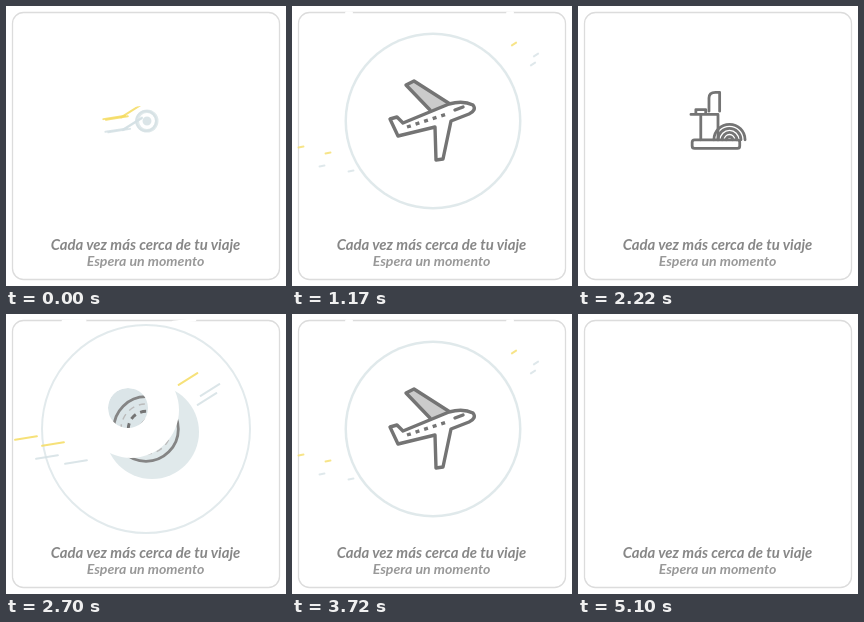
Write an HTML page that moves like this. It is 280 px wide and 280 px high and loops after 5.13 s.

```html
<!DOCTYPE html>
<html lang="es">
<head>
<meta charset="utf-8">
<style>
html, body { margin: 0; width: 100%; height: 100%; overflow: hidden; background: #fff; }
svg { display: block; width: 280px; height: 280px; }
text { font-family: Lato, sans-serif; font-style: italic; font-weight: 700; text-anchor: middle; }
.line { fill: none; stroke: #747474; stroke-width: 3.4; stroke-linejoin: round; stroke-linecap: round; }
.thin { stroke: #858585; stroke-width: 2.3; }
.dash { stroke-dasharray: 5 4; stroke-linecap: butt; }
.white { fill: #fff; }
.grey { fill: #cbcbcb; }
</style>
</head>
<body>
<svg viewBox="0 0 280 280">
  <rect x="6.5" y="6.5" width="267" height="267" rx="11" fill="#fff" stroke="#dcdcdc" stroke-width="1.3"/>
  <circle id="disc" fill="#e0e9eb"/>
  <circle id="backdrop" fill="#fff"/>
  <circle id="core" fill="#dbe5e8"/>
  <g id="icon">
    <g id="plane">
      <path class="line grey" d="M138 104L114 79L122 75L158 98"/>
      <path class="line white" d="M98 113L105 111L111 117L157 98Q171 94 181 99Q185 104 177 108L159 115L151 153L144 154L143 121L106 130Z"/>
      <path class="line" d="M115 121L155 108" stroke-dasharray="4 5" style="stroke-linecap:butt"/>
      <path class="line" d="M163 104L171 101"/>
    </g>
    <g id="engine" class="line" transform="translate(140 115) scale(.82) translate(-140 -115)">
      <rect x="108.5" y="138" width="58" height="10.5" rx="3"/>
      <path d="M129 103V87Q129 80 137 80H142V103M107 107H140M113 107V101H125V107M119 107V138M140 107V138"/>
      <g id="wheel"></g>
    </g>
    <g id="compass">
      <circle class="line thin" cx="140" cy="115" r="26.5"/>
      <circle class="line dash" cx="140" cy="115" r="20.5" style="stroke:#bbb;stroke-width:1.2"/>
      <circle class="line dash" cx="140" cy="115" r="14.5" style="stroke-width:2.4"/>
      <g id="needle">
        <path class="line thin grey" d="M117 115L134 110H146L163 115L146 120H134Z"/>
        <circle class="line thin white" cx="140" cy="115" r="3.6"/>
      </g>
    </g>
    <rect id="logo" x="99" y="74.5" width="82" height="81" fill="#b5b5b5"/>
  </g>
  <path id="wipe" fill="#fff" fill-rule="evenodd"/>
  <circle id="shock" fill="#d9e3e6" stroke="#d3dfe3"/>
  <g id="streaks" stroke-linecap="round"></g>
  <text x="139.5" y="244" font-size="14.9" fill="#878787">Cada vez más cerca de tu viaje</text>
  <text x="139.5" y="260" font-size="14.1" fill="#999">Espera un momento</text>
</svg>
<script>
const LOOP = 5130, CYCLE = LOOP / 6, STEP = 30;
const BURST = 120, SETTLE = 180;
const CX = 140, CY = 115;
const ORDER = ['engine', 'plane', 'engine', 'compass', 'plane', 'logo'];

const el = id => document.getElementById(id);
const set = (node, attrs) => { for (const k in attrs) node.setAttribute(k, attrs[k]); };
const clamp = x => Math.max(0, Math.min(1, x));
const ramp = (p, from, length) => clamp((p - from) / length);
const easeOut = u => 1 - (1 - u) ** 2;
const mix = (a, b, u) => a + (b - a) * u;
const wave = u => Math.sin(Math.PI * u);

function add(parent, tag, attrs) {
  const node = document.createElementNS('http://www.w3.org/2000/svg', tag);
  set(node, attrs);
  el(parent).append(node);
  return node;
}

for (let r = 4; r < 20; r += 5) {
  add('wheel', 'path', { d: `M${154 - r} 138a${r} ${r} 0 0 1 ${2 * r} 0` });
}

// A disc swells while it swings aside, then opens out over the centre.
const DISC = { dx: 5, dy: 3, start: 11.5, burst: 47, end: 88.5, power: 2.6 };
const WIPE = { dx: -16, dy: -19, start: 8, burst: 48, end: 86, power: 1.4 };
const HOLE = { dx: -19, dy: -21, start: 4.5, burst: 20, end: 86, power: .3 };

function swell({ dx, dy, start, burst, end, power }, p) {
  const open = easeOut(ramp(p, BURST, SETTLE));
  const swing = wave(ramp(p, 0, 60) / 2) * (1 - open);
  const r = mix(mix(start, burst, ramp(p, 0, BURST) ** power), end, open);
  return [CX + 1 + dx * swing, CY + dy * swing, r];
}

const circlePath = ([x, y, r]) => `M${x - r} ${y}a${r} ${r} 0 1 0 ${2 * r} 0a${r} ${r} 0 1 0 ${-2 * r} 0Z`;
const circle = (id, [cx, cy, r], opacity) => set(el(id), { cx, cy, r, opacity });

// Colour and the offset from the centre reached at the end of the burst.
const YELLOW = '#f5dc62', BLUE = '#d5e1e5', WHITE = '#fff';
const STREAKS = [
  [YELLOW, 42, -50], [YELLOW, -120, 9], [YELLOW, -93, 15],
  [BLUE, 64, -39], [BLUE, 61, -30], [BLUE, -99, 28], [BLUE, -70, 33],
  [WHITE, -72, -108], [WHITE, 38, -108]
].map(([stroke, dx, dy]) => ({
  dx, dy, stroke,
  node: add('streaks', 'line', { stroke, 'stroke-width': stroke === WHITE ? 3 : 2 })
}));

function drawStreak({ node, dx, dy, stroke }, p) {
  const u = ramp(p, 0, BURST);
  const reach = .1 + .9 * u ** 3;
  const drift = easeOut(ramp(p, BURST, SETTLE)) + .3 * ramp(p, 300, 210);
  const right = dx > 0;
  const x = mix(118, CX, reach) + dx * reach + drift * (right ? 40 : -11);
  const y = mix(stroke === BLUE ? 122 : 110, CY, reach) + dy * reach
    + (stroke === WHITE ? 0 : drift * (right ? -27 : 17));
  const half = mix(11, 2.5, clamp(drift)) + 20 * wave(u);
  const angle = (right ? -32 : -9) * Math.PI / 180 * (stroke === WHITE ? .2 : 1);
  const ex = half * Math.cos(angle), ey = half * Math.sin(angle);
  set(node, {
    x1: x - ex, y1: y - ey, x2: x + ex, y2: y + ey,
    opacity: p >= 510 ? 0 : stroke === WHITE ? 1 : .85 - .4 * ramp(p, 240, 240)
  });
}

function drawIcon(name, p) {
  const pop = ramp(p, 30, 30) * (1 + .22 * wave(ramp(p, 60, 120)));
  const size = pop * (1 - ramp(p, 600, 210) ** 1.5);
  const rise = 21 * clamp(2 - p / 60);
  for (const id of new Set(ORDER)) el(id).style.display = id === name ? '' : 'none';
  set(el('icon'), {
    transform: `translate(${CX} ${CY + rise}) scale(${size}) translate(${-CX} ${-CY})`,
    opacity: size > 0 ? 1 : 0
  });
  set(el('needle'), { transform: `rotate(${5 + (630 - p) * .6} ${CX} ${CY})` });
}

function drawBurst(p) {
  const u = ramp(p, 0, BURST);
  const fade = ramp(p, 300, 150);
  const ring = swell(DISC, p), hole = swell(HOLE, p);
  ring[2] += 8.5 * fade;
  circle('disc', ring, 1 - fade);
  circle('backdrop', [CX + 1, CY, mix(0, 86, easeOut(ramp(p, BURST, SETTLE))) + 9.5 * fade], 1);
  circle('core', hole, Math.abs(Math.cos(Math.PI * u)) * (1 - ramp(p, BURST, 90)));
  set(el('wipe'), { d: circlePath(swell(WIPE, p)) + circlePath(hole), opacity: p < 300 ? 1 : 0 });

  const spread = ramp(p, BURST, 90);
  circle('shock', [CX + 7 * wave(u), CY + 6 * wave(u), 10 + 94 * u ** 4.6 + 8 * spread], .65 * (1 - spread));
  set(el('shock'), { 'fill-opacity': .8 * wave(u), 'stroke-width': 2 + wave(u) });
}

function draw(time) {
  const t = time % LOOP;
  const cycle = Math.floor(t / CYCLE);
  const p = Math.floor((t - cycle * CYCLE) / STEP) * STEP;
  drawBurst(p);
  drawIcon(ORDER[cycle], p);
  for (const streak of STREAKS) drawStreak(streak, p);
}

const start = performance.now();
function tick() {
  draw(performance.now() - start);
  requestAnimationFrame(tick);
}
tick();
</script>
</body>
</html>
```
